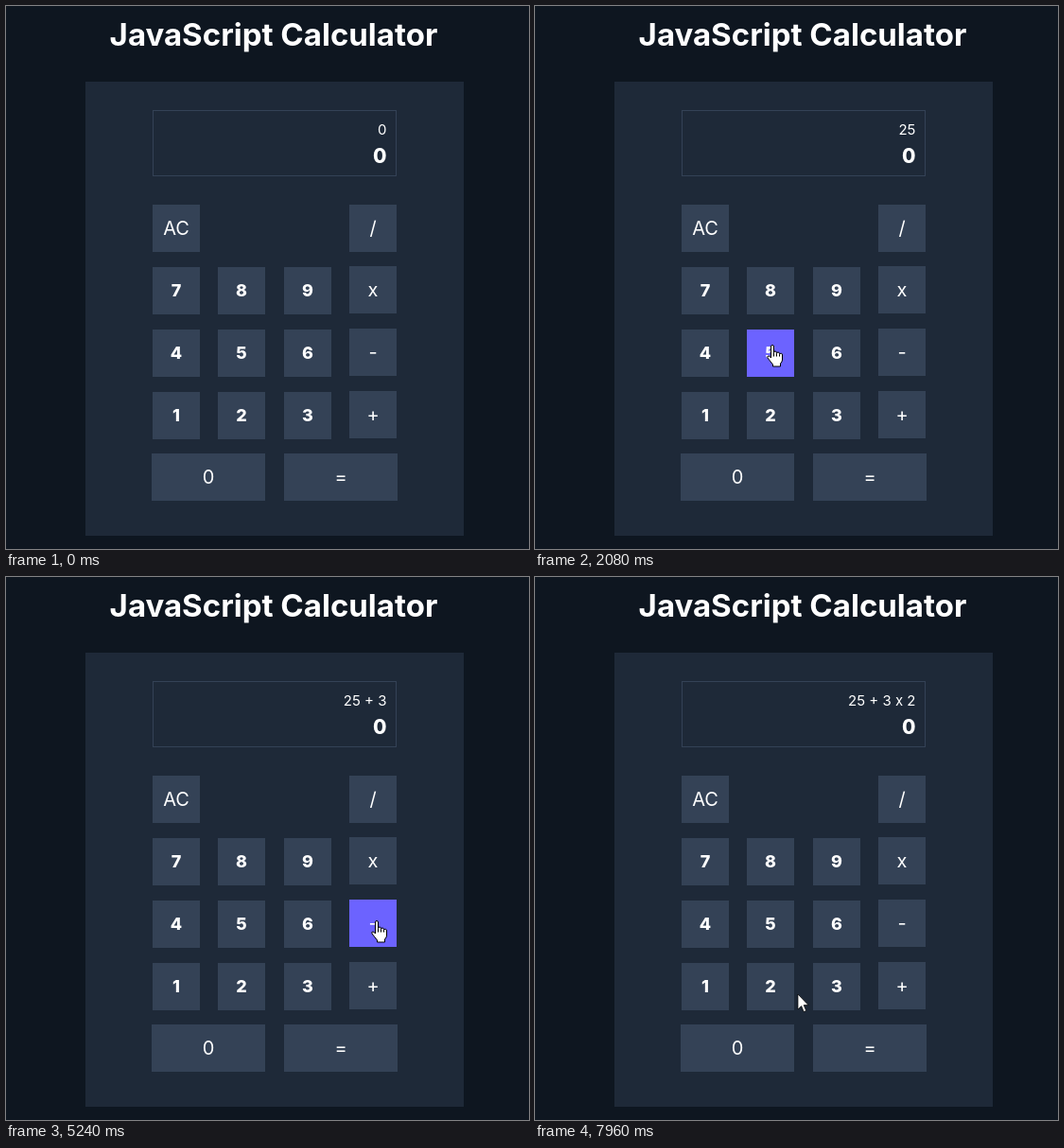
Recreate the animation shown at these times as an HTML page. Size 553 by 574 pixels, loop 8 s.

```html
<!DOCTYPE html>
<html lang="en">
<head>
<meta charset="utf-8">
<title>JavaScript Calculator</title>
<style>
html, body { margin: 0; width: 100%; height: 100%; overflow: hidden; background: #0e1620; }
svg { display: block; }
text { font-family: Inter, "Open Sans", sans-serif; fill: #fff; }
.key rect { fill: #344256; }
.key.hover rect { fill: #6c63ff; }
.key text { font-size: 20px; text-anchor: middle; }
.key .digit { font-size: 18px; font-weight: 800; }
.cursor { fill: #fff; stroke: #000; stroke-linejoin: round; }
</style>
</head>
<body>
<svg width="553" height="574" viewBox="0 0 553 574">
  <text x="283" y="42" font-size="33" font-weight="700" text-anchor="middle">JavaScript Calculator</text>
  <rect x="84" y="80" width="400" height="480" fill="#1e2938"/>
  <rect x="155.5" y="110.5" width="257" height="69" fill="none" stroke="#344256"/>
  <text id="formula" x="402.5" y="136" font-size="15" text-anchor="end">0</text>
  <text x="402.5" y="166" font-size="21" font-weight="800" text-anchor="end">0</text>
  <g id="keys"></g>
  <circle id="ring" r="12" fill="#ff0" fill-opacity=".5"/>
  <path id="arrow" class="cursor" stroke-width=".7" d="M0 0V16L3.7 12.6 6.2 18.6 8.7 17.5 6.2 11.6H11Z"/>
  <path id="hand" class="cursor" d="M-1.5 14V2a1.5 1.5 0 0 1 3 0V8.5a1.5 1.5 0 0 1 3 0v1a1.5 1.5 0 0 1 3 0v1a1.5 1.5 0 0 1 3 .5V16q0 2-2 4v3H.5v-2L-5 14q-1-2 1-2 1.3 0 2.5 2ZM1.5 8.5v4M4.5 9.5v3M7.5 10.5v2"/>
</svg>
<script>
const LOOP = 8000, STEP = 77, ENTER = 370, PRESS = 80;
const $ = id => document.getElementById(id);

// Pointer path: time, x, y
const path = [
  [370, 446, 530], [840, 293, 426], [1150, 265, 427], [1240, 265, 428],
  [1470, 265, 428], [1920, 251, 358], [2170, 251, 358], [2860, 399, 430],
  [4050, 399, 430], [4310, 340, 434], [4540, 340, 434], [5240, 392, 363],
  [5700, 390, 305], [5950, 390, 305], [6030, 390, 304], [6500, 390, 304],
  [7330, 256, 421], [7410, 256, 423], [7800, 256, 423], [7960, 278, 441]
];

// Each press shows the ring; its text appears on release.
const presses = [
  [1390, "2"], [2000, "25"], [3970, "25 +"], [4460, "25 + 3"],
  [6330, "25 + 3 x"], [7560, "25 + 3 x 2"]
];

const keys = [];
function addKey(label, x, y, w = 50) {
  const digit = w === 50 && /\d/.test(label);
  const g = document.createElementNS("http://www.w3.org/2000/svg", "g");
  g.setAttribute("class", "key");
  g.innerHTML = `<rect x="${x}" y="${y}" width="${w}" height="50"/>
    <text x="${x + w / 2}" y="${y + (digit ? 31 : 32)}" class="${digit ? "digit" : ""}">${label}</text>`;
  $("keys").append(g);
  keys.push({ g, x, y, w });
}

const columns = [155, 224, 294];
["789", "456", "123"].forEach((row, r) =>
  [...row].forEach((d, c) => addKey(d, columns[c], 276 + 66 * r)));
addKey("AC", 155, 210);
["/", "x", "-", "+"].forEach((op, i) => addKey(op, 363, i ? 209 + 66 * i : 210));
addKey("0", 154, 473, 120);
addKey("=", 294, 473, 120);

function pointerAt(t) {
  const i = path.findIndex(p => p[0] > t);
  if (i < 0) return path[path.length - 1].slice(1);
  if (i === 0) return path[0].slice(1);
  const [t0, x0, y0] = path[i - 1], [t1, x1, y1] = path[i];
  const steps = Math.max(1, Math.round((t1 - t0) / STEP));
  const k = Math.floor((t - t0) / (t1 - t0) * steps) / steps;
  return [x0 + (x1 - x0) * k, y0 + (y1 - y0) * k].map(Math.round);
}

function show(el, visible, x, y) {
  el.style.display = visible ? "" : "none";
  el.setAttribute("transform", `translate(${x} ${y})`);
}

function draw(t) {
  const [x, y] = pointerAt(t);
  const visible = t >= ENTER;
  let over = false;
  for (const key of keys) {
    const hit = visible && x >= key.x && x < key.x + key.w && y >= key.y && y < key.y + 50;
    key.g.classList.toggle("hover", hit);
    over ||= hit;
  }
  show($("arrow"), visible && !over, x, y);
  show($("hand"), visible && over, x, y);
  show($("ring"), presses.some(([p]) => t >= p && t < p + PRESS), x, y - 1);
  const done = presses.filter(([p]) => t >= p + PRESS).pop();
  $("formula").textContent = done ? done[1] : "0";
}

const start = performance.now();
function tick() {
  draw((performance.now() - start) % LOOP);
  requestAnimationFrame(tick);
}
tick();
</script>
</body>
</html>
```
